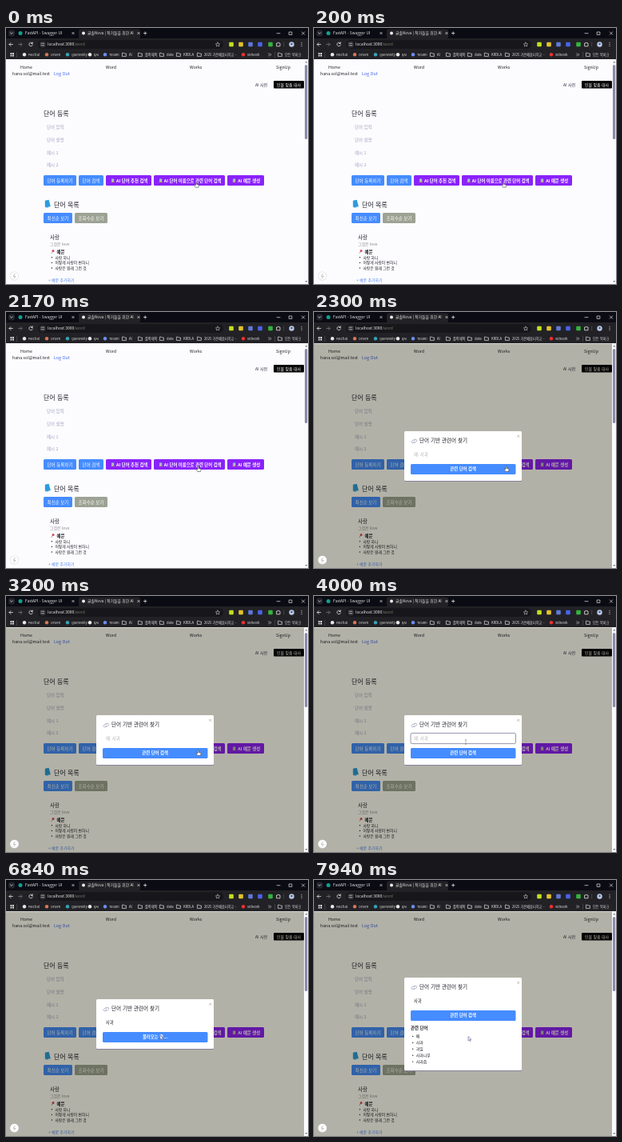
These frames come from a looping animation (378 px wide and 320 px high, 8000 ms). An HTML page:

```html
<!DOCTYPE html>
<html lang="ko">
<head>
<meta charset="utf-8">
<title>단어 등록</title>
<style>
html, body { margin: 0; width: 100%; height: 100%; overflow: hidden; background: #fcfcfe; }
svg { display: block; width: 100vw; height: 100vh; }
text { font-family: "Noto Sans CJK KR", "Noto Sans CJK", "Noto Sans", sans-serif; white-space: pre; }
.line { fill: none; stroke-linecap: round; stroke-linejoin: round; }
#overlay { mix-blend-mode: multiply; }
</style>
</head>
<body>
<svg id="stage" viewBox="0 0 378 320"></svg>
<script>
const BLUE = '#458cff', PURPLE = '#8a22fb', INK = '#20202a', PALE = '#e4e4e4';
const STRIP = '#0b0b14', BAR = '#222226';

// Markup helpers
const rect = (x, y, w, h, fill, r = 0, extra = '') =>
  `<rect x="${x}" y="${y}" width="${w}" height="${h}" rx="${r}" fill="${fill}" ${extra}/>`;
const dot = (x, y, r, fill) => `<circle cx="${x}" cy="${y}" r="${r}" fill="${fill}"/>`;
const line = (d, color, width = .8) => `<path class="line" d="${d}" stroke="${color}" stroke-width="${width}"/>`;
const shape = (d, fill) => `<path d="${d}" fill="${fill}"/>`;
const text = (x, y, size, str, fill = INK, weight = 400, anchor = 'start', id = '') =>
  `<text x="${x}" y="${y}" font-size="${size}" fill="${fill}" font-weight="${weight}" text-anchor="${anchor}" id="${id}">${str}</text>`
    .replace(' id=""', '');
const group = (id, body) => `<g id="${id}">${body}</g>`;
const cross = (x, y, r, color) => line(`M${x - r} ${y - r}l${2 * r} ${2 * r}m0 ${-2 * r}l${-2 * r} ${2 * r}`, color, .7);
const folder = x => line(`M${x - 2.2} 31.2h1.6l.8.8h2.2v3.4h-4.6z`, PALE, .7);
const crystal = (x, y) => shape(`M${x - 2.2} ${y + 2.4}l.9-1.6h2.6l.9 1.6z`, '#c9a850') + dot(x, y - .4, 1.8, '#b9c4d0') + dot(x - .5, y - .8, .7, '#6fb8a4');
const button = (x, y, w, label, fill, icon = false) =>
  rect(x, y, w, 13, fill, 1.6) + (icon ? crystal(x + 8.6, y + 6.5) : '') +
  text(x + w / 2 + (icon ? 4.2 : 0), y + 8.5, icon ? 5.35 : 5.5, label, '#fff', icon ? 600 : 400, 'middle');
const bullets = (x, y, step, size, items) =>
  items.map((s, i) => dot(x, y + i * step - 1.8, .7, INK) + text(x + 4, y + i * step, size, s)).join('');

function browserBar() {
  const bookmarks = [
    [28, 'PalChat', '#e8e8e8'], [56, 'Orlven', '#d97757'], [82, 'Quenvolity', '#33a5b4'],
    [110, 'qAI', '#e8e8e8'], [129, 'Tolumi', '#6f8df5'], [302, 'VidNook', '#f03030']
  ];
  const folders = [[148, 'AI'], [168, '졸작제작'], [195, 'data'], [216, 'KRDLA'], [242, '2025 가온배움터학교…'], [343, '모든 북마크']];
  const extensions = [[282, '#c3e01e'], [294, '#e3c22c'], [306, '#5f78d8'], [318, '#4a62e8'], [331, '#36b23c']];
  return rect(0, 0, 378, 14, STRIP) + rect(0, 13, 378, 26.5, BAR) + rect(91, 1.5, 77, 12, BAR, 2.5) +
    rect(3, 2.5, 8, 8, '#24252c', 2.4) + line('M5.4 5.8l1.6 1.6 1.6-1.6', PALE) +
    dot(18, 6.5, 2.5, '#12a08e') + text(24, 8.3, 4.8, 'FastAPI - Swagger UI', PALE, 500) + cross(84, 6.5, 1.2, PALE) +
    dot(97, 6.5, 2, '#f0f0f0') + text(102, 8.3, 4.8, '글솔Nova | 작가들을 위한 AI', PALE, 500) +
    cross(166, 6.5, 1.2, PALE) + line('M172.5 6.5h3.4m-1.7-1.7v3.4', PALE) +
    line('M339 6.7h4', PALE, .7) + line('M354.5 5h3.4v3.4h-3.4z', PALE, .7) + cross(372, 6.6, 1.7, PALE) +
    line('M8.4 20.5H4m2-2l-2 2 2 2', PALE) + line('M15.6 20.5H20m-2-2l2 2-2 2', '#77777c') +
    line('M33 19a2.3 2.3 0 1 0 .4 2M33.2 17.8v1.7h-1.7', PALE) +
    rect(40, 15.2, 232, 10.8, '#17171b', 5.4) + rect(42, 16.4, 8, 8.4, '#2b2b30', 4.2) +
    line('M44 19.2h3.8m-3.8 2.6h3.8', PALE, .7) +
    text(52, 22.3, 4.9, 'localhost:3000<tspan fill="#77776a">/word</tspan>', '#eee') +
    line('M265 18l.8 1.7 1.9.2-1.4 1.2.4 1.9-1.7-1-1.7 1 .4-1.9-1.4-1.2 1.9-.2z', '#c4c4c8', .6) +
    extensions.map(([x, c]) => rect(x - 2.8, 17.7, 5.6, 5.6, c, 1)).join('') +
    line('M339 19h1.2a.8.8 0 0 1 1.6 0h1.2v3.8h-4z', PALE) + rect(347.5, 17.5, .6, 6, '#55555c') +
    dot(357.5, 20.5, 3.2, '#b9cbe8') + dot(357.5, 20, 1.2, '#4a5a78') +
    [18.5, 20.5, 22.5].map(y => dot(370, y, .6, PALE)).join('') +
    [0, 1, 2, 3].map(i => rect(5.5 + (i % 2) * 2.6, 31 + (i >> 1) * 2.6, 1.9, 1.9, PALE)).join('') +
    rect(13.5, 30, .6, 7, '#55555c') +
    bookmarks.map(([x, s, c]) => dot(x - 5, 33.3, 2.2, c) + text(x, 34.9, 3.9, s, PALE, 500)).join('') +
    folders.map(([x, s]) => folder(x) + text(x + 6, 34.9, 4.2, s, PALE, 500)).join('') +
    line('M328.5 31.8l1.5 1.5-1.5 1.5m2-3l1.5 1.5-1.5 1.5', PALE, .6) + rect(336, 30, .6, 7, '#55555c');
}

function page() {
  const nav = [[18, 'Home'], [125, 'Word'], [230, 'Works'], [338, 'SignUp']];
  const fields = ['단어 입력', '단어 설명', '예시 1', '예시 2'];
  return rect(0, 39, 378, 281, '#fcfcfe') +
    nav.map(([x, s]) => text(x, 50.8, 5.3, s)).join('') +
    text(8, 58.7, 5.2, 'hana.sol@mail.test') + text(60, 58.9, 5.3, 'Log Out', '#3a62f0') +
    text(312, 72.6, 5, 'AI 사전', '#34344a') + rect(335, 66, 38, 9.5, '#050505', 1) +
    text(354, 72.6, 5, '인물 맞춤 대사', '#fff', 500, 'middle') +
    text(47, 109.8, 8, '단어 등록', INK, 500) +
    fields.map((s, i) => text(51, 126 + i * 15.8, 5.4, s, '#a3a2c2')).join('') +
    button(47, 184, 41, '단어 등록하기', BLUE) + button(91, 184, 31, '단어 검색', BLUE) +
    button(125, 184, 57, 'AI 단어 추천 검색', PURPLE, true) +
    button(185, 184, 89, 'AI 단어 이름으로 관련 단어 검색', PURPLE, true) +
    button(277, 184, 46, 'AI 예문 생성', PURPLE, true) +
    shape('M48.8 215.8l4.8-1 2.3 8.4-5 1.7-2.1-1.1z', '#2d9be0') + line('M49.6 224l1.5.6 4.6-1.5', '#d8e8f2') +
    text(60, 223.5, 8, '단어 목록', INK, 500) +
    button(47, 231, 36, '최신순 보기', BLUE) + button(86, 231, 41, '조회수순 보기', '#9ca394') +
    text(55, 264.3, 6.4, '사랑', INK, 500) + text(55, 271.6, 4.9, '그것은 love', '#85858d') +
    line('M57 281.5l1.6-2.2', '#888') + dot(59, 278.6, 1.5, '#d84858') + text(63.5, 281.8, 5.4, '예문', INK, 600) +
    bullets(57.4, 288.6, 6.6, 4.8, ['사랑 하니', '어떻게 사랑이 변하니', '사랑은 원래 그런 것']) +
    text(53, 317, 4.9, '+ 예문 추가하기', '#4a80f0');
}

function scrollbar() {
  return rect(373, 39.5, 5, 280.5, '#fafafd') + rect(374, 46, 3.2, 93, '#8a8aaa', 1.5) +
    shape('M374.3 43.5h3l-1.5-2z', '#77778a') + shape('M374.3 316h3l-1.5 2z', '#77778a');
}

function modal() {
  const icon = line('M125.3 160.6l1-1a1.3 1.3 0 0 1 1.9 1.9l-1.5 1.5a1.3 1.3 0 0 1-1.9 0', '#9a9cb8') +
    line('M125.5 162.4l-1 1a1.3 1.3 0 0 1-1.9-1.9l1.5-1.5a1.3 1.3 0 0 1 1.9 0', '#9a9cb8');
  return rect(113, 150, 147, 62, '#85839a', 1.5, 'id="shadow"') + rect(113, 149, 147, 62, '#fff', 1.5, 'id="card"') +
    group('content',
      icon + text(132, 163.2, 6.6, '단어 기반 관련어 찾기', INK, 500) +
      cross(255.7, 155.3, 1.1, '#a9a686') +
      rect(121, 171.4, 131.5, 13.2, 'none', 1.8, 'id="focusRing" stroke="#7d7a98" stroke-width=".8"') +
      text(125, 179.9, 5.3, '', INK, 400, 'start', 'typed') + rect(0, 175.2, .6, 5.8, INK, 0, 'id="caret"') +
      rect(121, 190, 131.5, 13, BLUE, 1.6) + text(186.6, 198.2, 5.35, '', '#fff', 600, 'middle', 'search')) +
    group('results', text(121, 187.2, 5.4, '관련 단어', INK, 600) +
      bullets(123.7, 197.3, 7.9, 4.9, ['배', '사과', '과일', '사과나무', '사과즙']));
}

const pointers = group('hand', `<path d="M-.6 .7Q0-.4 .6 .7V3l2.3.6q.7.3.6 1L2.9 7H-.7L-2.5 4.4q0-.9.8-.7l1.1.8z" fill="#fff" stroke="#25252d" stroke-width=".5"/>`) +
  group('arrow', `<path d="M0 0v5.4l1.3-1.2 1 2 .9-.5-1-1.9h1.7z" fill="#fff" stroke="#555a90" stroke-width=".6"/>`) +
  group('beam', line('M-.8-2.6h1.6M0-2.6v5.2m-.8 0h1.6', '#77755c', .5));

const badge = dot(10.5, 310, 5.6, '#d6d6da') + dot(10.5, 310, 5.1, '#fff') + line('M11.2 307.2l-2.2 3.2h3l-2 2.6', '#99998c', .6);

const stage = document.getElementById('stage');
stage.innerHTML = browserBar() + page() +
  rect(0, 39.5, 373, 280.5, '#b4b3a8', 0, 'id="overlay"') +
  scrollbar() + badge + group('dialog', modal()) + group('cursor', pointers);

const el = Object.fromEntries([...stage.querySelectorAll('[id]')].map(n => [n.id, n]));
const show = (node, visible) => node.setAttribute('display', visible ? 'inline' : 'none');
const move = (node, x, y) => node.setAttribute('transform', `translate(${x} ${y})`);

// Pointer path: [ms, x, y]
const path = [
  [0, 238, 192.3], [40, 238, 192.3], [340, 236.5, 192], [970, 236.5, 192], [1140, 241, 192.5],
  [1400, 241, 192.5], [1470, 247, 192.5], [1540, 246, 192.5], [1940, 246, 192.2], [2170, 240.5, 192.5],
  [3200, 240.5, 192.5], [3500, 249, 186], [3870, 249, 186], [4000, 190, 182.5],
  [5770, 190, 182.5], [6570, 193, 194], [6840, 193, 194], [7940, 193, 195.5], [8000, 193, 195.5]
];
function pointerAt(t) {
  const i = path.findIndex(p => p[0] > t), [t0, x0, y0] = path[i - 1], [t1, x1, y1] = path[i];
  const k = (t - t0) / (t1 - t0);
  return [x0 + (x1 - x0) * k, y0 + (y1 - y0) * k];
}

const typing = [[4940, 'ㅅ'], [5100, '사'], [5240, '사고'], [5270, '사과']];

function render(t) {
  const open = t >= 2300, done = t >= 7940, loading = t >= 6600 && !done;
  const focused = t >= 3400 && t < 6400;
  show(el.overlay, open);
  show(el.dialog, open);
  show(el.results, done);
  move(el.content, 0, done ? -27 : 0);
  for (const [node, gap] of [[el.card, 0], [el.shadow, 1]]) {
    node.setAttribute('y', (done ? 122 : 149) + gap);
    node.setAttribute('height', done ? 116 : 62);
  }

  const word = typing.filter(([at]) => t >= at).map(([, s]) => s).pop();
  el.typed.textContent = word || '예: 사과';
  el.typed.setAttribute('fill', word ? INK : '#b2b2b4');
  el.search.textContent = loading ? '불러오는 중...' : '관련 단어 검색';
  show(el.focusRing, focused);
  const blinkOn = t < 4000 || (t >= 4540 && t < 5770) || t % 1060 < 530;
  show(el.caret, focused && blinkOn);
  el.caret.setAttribute('x', 125 + (word ? word.length * 5 : 0));

  const [x, y] = pointerAt(t);
  const inField = t >= 3400 && y > 171 && y < 188;
  move(el.cursor, x, y);
  show(el.beam, inField);
  show(el.arrow, !inField && t >= 6840);
  show(el.hand, !inField && t < 6840);
}

function tick() {
  render(performance.now() % 8000);
  requestAnimationFrame(tick);
}
tick();
</script>
</body>
</html>
```
